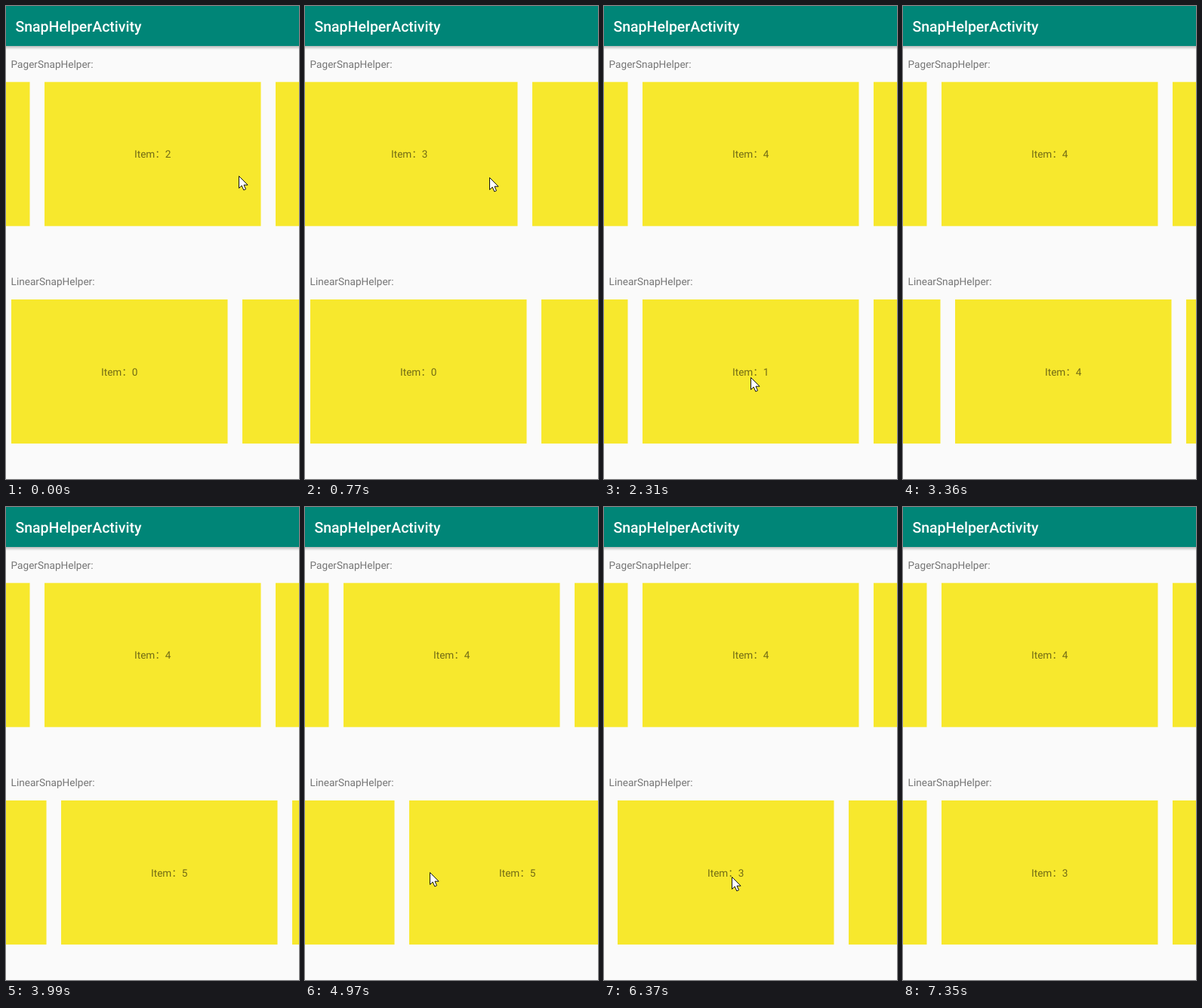
An HTML page with a canvas for the animation above (7980 ms loop, 388 by 627 pixels).

```html
<!DOCTYPE html>
<html lang="zh-CN">
<head>
<meta charset="utf-8">
<title>SnapHelperActivity</title>
<style>
  html, body { margin: 0; width: 388px; height: 627px; overflow: hidden; background: #fafafa; }
  canvas { display: block; }
</style>
</head>
<body>
<canvas id="stage" width="388" height="627"></canvas>
<script>
const ctx = document.getElementById('stage').getContext('2d');
const LOOP = 7980, STEP = 70;
const CARD = 286.5, PITCH = 306, MARGIN = 7;
const CRUISE = 1.16;            // fling speed, px per ms
const BRAKE = 337;              // braking starts once the wanted card shows
const FAMILY = 'Roboto, "Noto Sans CJK SC", "Noto Sans CJK", sans-serif';
const snap = n => n * PITCH - 44;   // scroll that centres card n

// Each swipe drags the row between press and release, then snaps to a card.
const pagerSwipes = [
  { press: 0, release: 190, x: 308, y: 225, drag: 152, to: 3 },
  { press: 700, release: 890, x: 300, y: 227, drag: 152, to: 4 }
];
const linearSwipes = [
  { press: 1575, release: 1722, x: 184, y: 474, drag: 126, to: 1 },
  { press: 2440, release: 2650, x: 195, y: 492, drag: 83, to: 5 },
  { press: 4933, release: 5051, x: 78, y: 484, drag: -276, to: 3 },
  { press: 6050, release: 6580, x: 202, y: 490, drag: 55, to: 3 }
];
// Where the pointer leaves and enters the screen: [time, x, y]
const away = [[2800, -20, 488], [4610, -20, 488], [7280, 170, 593], [7300, 170, 640]];

const clamp = p => Math.min(1, Math.max(0, p));
const easeOut = (p, power) => 1 - (1 - p) ** power;
const lerp = (a, b, p) => a + (b - a) * p;

function glide(from, to, dt, isReturn, maxBrakeTime) {
  if (isReturn) return lerp(from, to, easeOut(clamp(dt / 560), 5));
  const dist = Math.abs(to - from), dir = Math.sign(to - from);
  const brake = Math.min(dist, BRAKE);
  const cruiseTime = (dist - brake) / CRUISE;
  if (dt < cruiseTime) return from + dir * CRUISE * dt;
  const brakeTime = Math.min(brake / CRUISE / .3356, maxBrakeTime);
  return to - dir * brake * (1 - clamp((dt - cruiseTime) / brakeTime)) ** 2;
}

function scrollAt(swipes, start, t, maxBrakeTime = Infinity) {
  let scroll = start;
  for (const s of swipes) {
    if (t < s.press) break;
    const rest = scroll, end = snap(s.to);
    scroll += s.drag * clamp((t - s.press) / (s.release - s.press));
    if (t > s.release) scroll = glide(scroll, end, t - s.release, rest === end, maxBrakeTime);
  }
  return scroll;
}

// The pointer follows every drag and hurries to the next press in between.
const path = [...pagerSwipes, ...linearSwipes].flatMap(s => [
  [s.press, s.x, s.y], [s.release, s.x - s.drag, s.y, 'drag']
]).concat(away).sort((a, b) => a[0] - b[0]);

function pointerAt(t) {
  const i = path.findIndex(k => k[0] > t);
  if (i < 0) return path[path.length - 1].slice(1, 3);
  const [t0, x0, y0] = path[i - 1], [t1, x1, y1, drag] = path[i];
  const p = easeOut((t - t0) / (t1 - t0), drag ? 1 : 3);
  return [lerp(x0, x1, p), lerp(y0, y1, p)];
}

function text(str, x, y, font, color, align = 'left') {
  ctx.font = `${font} ${FAMILY}`;
  ctx.textRendering = 'geometricPrecision';
  ctx.fillStyle = color;
  ctx.textAlign = align;
  ctx.fillText(str, x, Math.round(y));
}

function row(label, top, scroll) {
  text(label, 6.6, top - 18.7, '13.6px', '#757575');
  for (let n = 0; n < 10; n++) {
    const x = Math.round(MARGIN + n * PITCH - scroll);
    if (x > 388 || x + CARD < 0) continue;
    ctx.fillStyle = '#f7e82d';
    ctx.fillRect(x, top, CARD, 191);
    text('Item：' + n, x + CARD / 2, top + 100.6, '13.6px', 'rgba(0,0,0,.54)', 'center');
  }
}

function header() {
  const shade = ctx.createLinearGradient(0, 53, 0, 58);
  shade.addColorStop(0, 'rgba(0,0,0,.26)');
  shade.addColorStop(1, 'rgba(0,0,0,0)');
  ctx.fillStyle = shade;
  ctx.fillRect(0, 53, 388, 5);
  ctx.fillStyle = '#008577';
  ctx.fillRect(0, 0, 388, 53);
  text('SnapHelperActivity', 12.4, 34, '500 19.5px', '#fff');
}

const arrow = new Path2D('M0 0V16L3.7 12.6L6.3 18.5L9 17.3L6.5 11.7H11.6Z');
function cursor(x, y) {
  ctx.save();
  ctx.translate(Math.round(x) + .5, Math.round(y) + .5);
  ctx.fillStyle = '#fff';
  ctx.strokeStyle = '#111';
  ctx.fill(arrow);
  ctx.stroke(arrow);
  ctx.restore();
}

function draw(now) {
  const t = Math.floor((now % LOOP) / STEP) * STEP;
  ctx.fillStyle = '#fafafa';
  ctx.fillRect(0, 0, 388, 627);
  header();
  row('PagerSnapHelper:', 100.7, scrollAt(pagerSwipes, snap(2), t, 430));
  row('LinearSnapHelper:', 389, scrollAt(linearSwipes, 0, t));
  cursor(...pointerAt(t));
}

let start;
function tick(now) {
  start ??= now;
  draw(now - start);
  requestAnimationFrame(tick);
}
requestAnimationFrame(tick);
</script>
</body>
</html>
```
